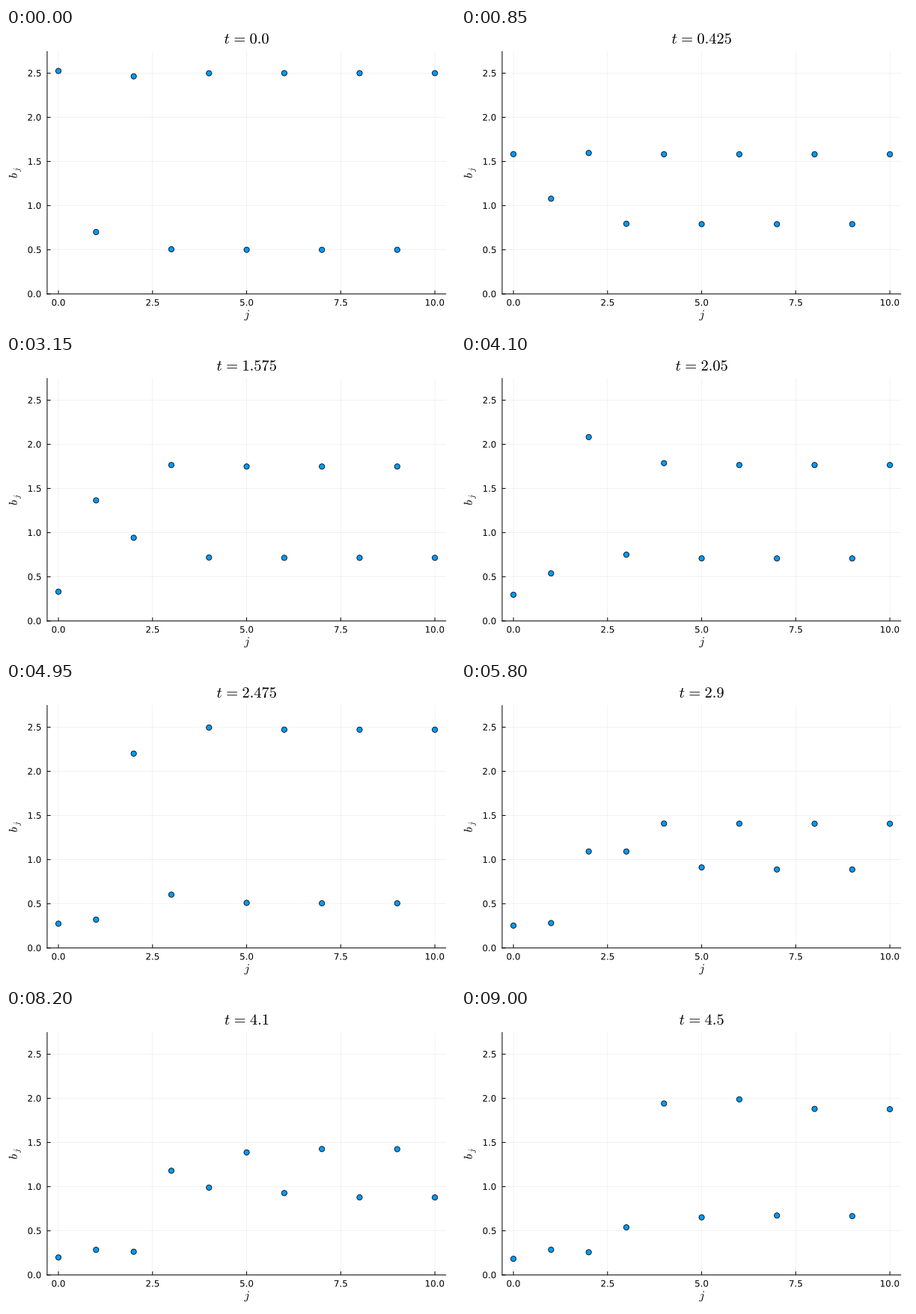
A matplotlib script for the animation above (9.05 s loop, 600 px wide and 400 px high).

```python
import numpy as np
import matplotlib.pyplot as plt
from matplotlib.animation import FuncAnimation
from matplotlib.patches import Circle, PathPatch
from matplotlib.textpath import TextPath
from matplotlib.transforms import Affine2D

plt.rcParams["font.family"] = "DejaVu Sans"
plt.rcParams["mathtext.fontset"] = "cm"

DPI = 100
PX = 72 / DPI  # points per pixel
FRAMES, STEP, DT = 181, 50, 0.025
COUNT = 11
LEFT, RIGHT, TOP, BOTTOM = 54.97, 588.19, 30.87, 355.8
MID = (LEFT + RIGHT) / 2

# Chebyshev nodes on the two bands [-3, -2] and [2, 3]
cheb = 0.5 * np.cos(np.pi * (np.arange(60) + 0.5) / 60)
nodes = np.concatenate([cheb - 2.5, cheb + 2.5])


def recurrence(t):
    """Off-diagonal Jacobi coefficients of the weight tilted by exp(t x)."""
    q = np.exp(t * (nodes - 3) / 2)
    basis = [q / np.linalg.norm(q)]
    coeffs = []
    for _ in range(COUNT):
        v = nodes * basis[-1]
        for _ in range(2):
            for u in basis:
                v = v - (u @ v) * u
        coeffs.append(np.linalg.norm(v))
        basis.append(v / coeffs[-1])
    return np.array(coeffs)


def to_x(j):
    return LEFT + (j + 0.3) * (RIGHT - LEFT) / 10.6


def to_y(b):
    return BOTTOM - b * (BOTTOM - TOP) / 2.75


def text_path(x, y, text, size, align=0.5, angle=0):
    """Outline of text with its ink aligned at x and its baseline at y."""
    path = TextPath((0, 0), text, size=size)
    box = path.get_extents()
    shift = box.x0 + align * box.width
    place = Affine2D().translate(-shift, 0).scale(1, -1)
    return place.rotate_deg(-angle).translate(x, y).transform_path(path)


fig = plt.figure(figsize=(6, 4), dpi=DPI, facecolor="white")
ax = fig.add_axes([0, 0, 1, 1])
ax.set_xlim(0, 600)
ax.set_ylim(400, 0)
ax.axis("off")


def line(xs, ys, width=1, alpha=1):
    ax.plot(xs, ys, color="black", lw=width * PX, alpha=alpha, zorder=2,
            snap=False, solid_capstyle="butt")


def grid(xs, ys):
    line(xs, ys, 0.5, 0.1)


def label(*args, **kw):
    patch = PathPatch(text_path(*args, **kw), fc="black", lw=0, snap=False)
    return ax.add_patch(patch)


for v in np.arange(0, 10.1, 2.5):
    x = to_x(v)
    grid([x, x], [TOP, BOTTOM])
    line([x, x], [BOTTOM, BOTTOM - 4.72])
    label(x, 371.5, f"{v:.1f}", 11.85)
for v in np.arange(0, 2.6, 0.5):
    y = to_y(v)
    grid([LEFT, RIGHT], [y, y])
    line([LEFT, LEFT + 4.72], [y, y])
    label(46.5, y + 4.32, f"{v:.1f}", 11.85, align=1)
line([LEFT, LEFT], [TOP, BOTTOM + 0.5])
line([LEFT - 0.5, RIGHT], [BOTTOM, BOTTOM])

label(MID, 388.2, "$j$", 16)
label(15, (TOP + BOTTOM) / 2 + 0.7, r"$b_{\hspace{0.2}j}$", 16, angle=90)


def title_path(t):
    text = rf"$t\hspace{{0.1}}=\hspace{{0.1}}{t}$"
    return text_path(MID - 0.2, 20.8, text, 20.4)


title = ax.add_patch(PathPatch(title_path(0.0), fc="black", lw=0, snap=False))
dots = [ax.add_patch(Circle((to_x(j), 0), 3.6, fc="#009afa", ec="black",
                            lw=0.8 * PX, zorder=3)) for j in range(COUNT)]


def update(i):
    t = round(i * DT, 3)
    title.set_path(title_path(t))
    for j, (dot, b) in enumerate(zip(dots, recurrence(t))):
        dot.set_center((to_x(j), to_y(b)))
    return [title, *dots]


anim = FuncAnimation(fig, update, frames=FRAMES, interval=STEP,
                     init_func=lambda: update(0), repeat=True, repeat_delay=0)
plt.show()
```
